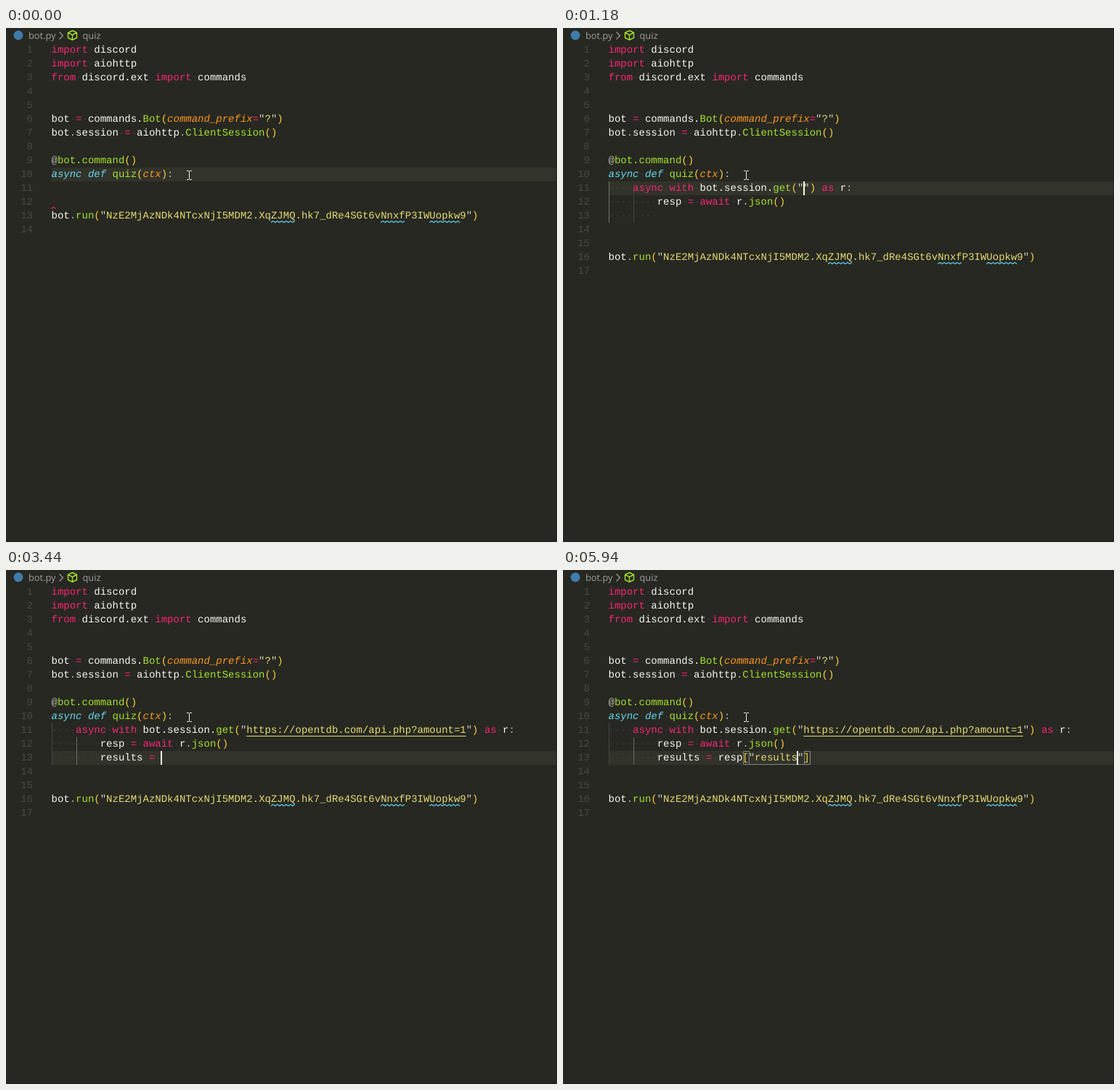
Animation, 759 px wide and 707 px high, one loop 6000 ms. Source, as an HTML page:

```html
<!DOCTYPE html>
<html lang="en">
<head>
<meta charset="utf-8">
<title>Code editor</title>
<style>
  html, body { margin: 0; width: 100%; height: 100%; overflow: hidden; background: #272822; }
  svg { display: block; width: 100%; height: 100%; }
  text { font: 14px "Liberation Mono", "Courier New", monospace; white-space: pre; text-rendering: geometricPrecision; }
  .crumb { font: 12.8px "Open Sans", "Noto Sans", sans-serif; fill: #a0a19a; }
  .num { fill: #484943; }
  .w { fill: #f8f8f2; }
  .k { fill: #f92672; }
  .f { fill: #a6e22e; }
  .b { fill: #fbd13c; }
  .s { fill: #e6db74; }
  .q { fill: #cfcfb4; }
  .p { fill: #b4b5ab; }
  .c { fill: #66d9ef; font-style: italic; }
  .a { fill: #fd971f; font-style: italic; }
  .item { fill: #b4b5ae; }
  .hit { fill: #f8f8f2; font-weight: bold; }
  .note { fill: #8e8f87; }
</style>
</head>
<body>
<svg id="stage" viewBox="0 0 759 707" preserveAspectRatio="none"></svg>
<script>
const LOOP = 6000, CHAR = 8.4, LEFT = 62.5, ROW = 19;
const stage = document.getElementById("stage");
const colX = col => LEFT + col * CHAR;
const rowY = row => 21 + (row - 1) * ROW;

const rect = (x, y, w, h, fill) => `<rect x="${x}" y="${y}" width="${w}" height="${h}" fill="${fill}"/>`;
const text = (cls, x, y, str) => `<text class="${cls}" x="${x}" y="${y}" xml:space="preserve">${str}</text>`;
const line = (d, color, w = 1) => `<path d="${d}" fill="none" stroke="${color}" stroke-width="${w}"/>`;

// Code lines: segments split by "|", the first letter of each is its style.
const HEAD = {
  1: "kimport|w discord",
  2: "kimport|w aiohttp",
  3: "kfrom|w discord.ext |kimport|w commands",
  6: 'wbot |k=|w commands.|fBot|b(|acommand_prefix|k=|q"|s?|q"|b)',
  7: "wbot|p.|wsession |k=|w aiohttp|p.|fClientSession|b()",
  9: "p@|fbot.command|b()",
  10: "casync def|f quiz|b(|actx|b)|p:"
};
const RUN = 'wbot|p.|frun|b(|q"|sNzE2MjAzNDk4NTcxNjI5MDM2.XqZJMQ.hk7_dRe4SGt6vNnxfP3IWUopkw9|q"|b)';
const URL_TEXT = "https://opentdb.com/api.php?amount=1";
const withLine = url => `k    async with|w bot.session.|fget|b(|q"|s${url}|q"|b)|k as|w r|p:`;
const block = (url, last = "") =>
  [withLine(url), "w        resp |k=|k await|w r|p.|fjson|b()", "w        " + last];
const typed = (last, col, popup = "", more = {}) =>
  ({ body: block(URL_TEXT, last), row: 13, col, popup, caret: 1, wavy: null, ...more });
const assign = (value, col, popup, more) => typed("results |k=|w " + value, col, popup, more);
const keyed = (word, more) => assign(`resp|b[|q"|s${word}|q"|b]`, 24 + word.length, "", { brackets: 25 + word.length, ...more });
const bang = (str, popup) => ({ body: ["w    " + str], col: 4 + str.length, popup, caret: 1 });

// Completion lists: the first letter is the icon kind.
const LISTS = {
  "!a": "s!ahtp fabs vaiohttp fall kand fany kas fascii kassert kasync sasync/with kawait",
  "!ah": "s!ahtp vaiohttp cArithmeticError sasync/with",
  "!aht": "s!ahtp vaiohttp cArithmeticError",
  "!ahtp": "s!ahtp vaiohttp",
  r: "vr kraise frange frepr vresp kreturn creversed fround cRecursionError cReferenceError cResourceWarning cRuntimeError",
  re: "vresp frepr kreturn creversed cRecursionError cReferenceError cResourceWarning frange kraise cRuntimeError cConnectionResetError cConnectionRefusedError",
  res: "vresp vresults cResourceWarning creversed cRecursionError cConnectionResetError cConnectionRefusedError",
  resu: "cResourceWarning cRecursionError cConnectionRefusedError",
  resp: "vresp"
};
const NOTES = { "!ahtp": "You need to have bo…", "async/with": "Code snippet for an…" };

const BEATS = [
  [0, { body: [], row: 10, col: 0, caret: 0, popup: "", error: 1, link: 0, wavy: null, brackets: 0 }],
  [160, { body: ["w    "], row: 11, col: 4, caret: 1 }],
  [470, { caret: 0 }],
  [620, bang("!", "")],
  [700, bang("!a", "!a")],
  [780, bang("!ah", "!ah")],
  [860, { ...bang("!aht", "!aht"), error: 0 }],
  [940, bang("!ahtp", "!ahtp")],
  [1100, { body: block(""), col: 32, popup: "" }],
  [1420, { body: block(URL_TEXT), col: 68 }],
  [1500, { link: 1 }],
  [1580, typed("", 8)],
  [1660, typed("r", 9)],
  [1730, { popup: "r" }],
  [1900, typed("re", 10, "re")],
  [2040, typed("res", 11, "res")],
  [2190, typed("resu", 12, "resu")],
  [2270, { wavy: [8, 12] }],
  [2430, typed("resul", 13, "", { wavy: [8, 12] })],
  [2510, { wavy: [8, 13] }],
  [2670, typed("result", 14)],
  [2750, typed("results", 15)],
  [2900, typed("results ", 16)],
  [3210, typed("results |k=", 17)],
  [3440, assign("", 18)],
  [3600, assign("r", 19, "r")],
  [3830, assign("re", 20, "re")],
  [3910, assign("res", 21, "res")],
  [3990, assign("resp", 22, "resp")],
  [4450, { caret: 0 }],
  [4610, assign("resp|b[]", 23, "", { brackets: 23 })],
  [4760, keyed("")],
  [5070, keyed("r")],
  [5300, keyed("re")],
  [5460, keyed("res")],
  [5620, keyed("resu", { wavy: [24, 28] })],
  [5780, keyed("resul", { wavy: [24, 29] })],
  [5860, keyed("result")],
  [5940, keyed("results")]
];

function codeLine(row, markup) {
  const y = rowY(row);
  let col = 0, out = "";
  for (const part of markup.split("|")) {
    const str = part.slice(1);
    const lead = str.length - str.trimStart().length;
    if (str.trim()) out += text(part[0], colX(col + lead), y + 13, str.trim());
    [...str].forEach((ch, i) => {
      if (ch === " ") out += rect(colX(col + i) + 3.7, y + 8.6, 1.3, 1.3, "#4b4c46");
    });
    col += str.length;
  }
  return out;
}

function squiggle(row, from, to, color) {
  const end = colX(to), y = rowY(row) + 16.5;
  let x = colX(from), d = `M${x} ${y + 2}`;
  for (let i = 0; x + 3 <= end; i++) d += `L${x += 3} ${y + (i % 2 ? 2 : 0)}`;
  return line(d, color, 1.2);
}

// Boxes around the bracket pair, joined along the bottom edge.
function bracketBoxes(row, open, close) {
  const y = rowY(row) + .5;
  const [a, b] = [open, close].map(col => Math.ceil(colX(col)) + .5);
  const box = x => `M${x} ${y}h8v18h-8z`;
  return line(`${box(a)}${box(b)}M${a + 8} ${y + 18}H${b}`, "#85867e");
}

const cube = (x, y, color) =>
  line(`M${x} ${y - 6.5}l6 3v7l-6 3l-6 -3v-7zM${x - 6} ${y - 3.5}l6 3l6 -3M${x} ${y - .5}v7`, color, 1.4);

const ICONS = {
  f: (x, y) => cube(x, y, "#a6e22e"),
  s: (x, y) => line(`M${x - 6.5} ${y + 5}v-11h13v11`, "#a6e22e", 1.2) +
    `<path d="M${x - 6.5} ${y + 6}h14" stroke="#a6e22e" stroke-width="1.3" stroke-dasharray="1.5 1.5"/>`,
  v: (x, y) => line(`M${x - 4.5} ${y - 4}h-2.5v8h2.5M${x + 4.5} ${y - 4}h2.5v8h-2.5`, "#66d9ef", 1.3) +
    line(`M${x - 3.5} ${y}l4 -2.5l3 1v2l-4 2.5l-3 -1zl3 1l4 -2.5`, "#66d9ef", 1.1),
  c: (x, y) => line(`M${x - 6} ${y - 2}l3.5 -3.5l2.5 2.5l-3.5 3.5zM${x - 1} ${y - 1}h4M${x + 1} ${y - 1}v5h2` +
    `M${x + 3} ${y - 1}l2 -2l1.5 1.5l-2 2zM${x + 3} ${y + 4}l2 -2l1.5 1.5l-2 2z`, "#66d9ef", 1.4),
  k: (x, y) => line(`M${x - 7} ${y - 4.5}h8m2 0h4M${x - 7} ${y - 1.5}h4m2 0h7M${x - 7} ${y + 1.5}h8m2 0h3M${x - 7} ${y + 4.5}h5m2 0h7`, "#f92672", 1.2)
};

function itemLabel(label, query) {
  const want = label[0] === "!" ? query : query.replace("!", "");
  let hit = 0;
  return [...label].map(ch => {
    const match = ch.toLowerCase() === want[hit];
    if (match) hit++;
    return `<tspan class="${match ? "hit" : "item"}">${ch}</tspan>`;
  }).join("");
}

function popup(query, row, col) {
  const items = LISTS[query].split(" ");
  const x = Math.floor(colX(col)), top = rowY(row + 1);
  let out = rect(x, top, 431, items.length * ROW, "#3c3d37") + rect(x, top, 430, ROW, "#6e7066");
  items.forEach((item, i) => {
    const y = top + i * ROW, label = item.slice(1);
    out += ICONS[item[0]](x + 11.5, y + 11) + text("item", x + 23.6, y + 14, itemLabel(label, query));
    if (NOTES[label]) out += text("note", x + 243.5, y + 14, NOTES[label]);
  });
  if (items.length === 12) out += `<rect x="${x + 420}" y="${top}" width="10" height="182" fill="#797979" opacity=".18"/>`;
  return out;
}

function breadcrumb() {
  return `<circle cx="17" cy="10" r="6.5" fill="#3f7cac"/>` +
    text("crumb", 31, 15, "bot.py") + line("M73.5 5.5l5 5l-5 5", "#a0a19a", 1.2) +
    cube(91.5, 10, "#a6e22e") + text("crumb", 105.5, 15, "quiz");
}

function draw(s) {
  const runRow = 13 + s.body.length;
  let out = rect(0, 0, 759, 707, "#272822") + breadcrumb();
  out += rect(63, rowY(s.row), 696, ROW, "#32332b");

  for (let n = 1; n <= runRow + 1; n++)
    out += `<text class="num" text-anchor="end" x="37" y="${rowY(n) + 13}">${n}</text>`;

  s.body.forEach((_, i) => {
    const y = rowY(11 + i), inner = s.row > 11;
    out += rect(63, y, 1, ROW, inner ? "#464741" : "#74756d");
    if (i) out += rect(97, y, 1, ROW, inner ? "#6c6d66" : "#464741");
  });

  for (const n in HEAD) out += codeLine(+n, HEAD[n]);
  s.body.forEach((markup, i) => out += codeLine(11 + i, markup));
  out += codeLine(runRow, RUN);

  for (const [from, to] of [[36, 40], [54, 58], [62, 67]]) out += squiggle(runRow, from, to, "#5ccdee");
  if (s.wavy) out += squiggle(s.row, ...s.wavy, "#5ccdee");
  if (s.error) out += squiggle(12, 0, 1, "#f5233f");
  if (s.link) out += rect(colX(32), rowY(11) + 17, 36 * CHAR, 1, "#e6db74");
  if (s.brackets) out += bracketBoxes(s.row, 22, s.brackets);

  if (s.popup) out += popup(s.popup, s.row, s.col);
  if (s.caret) out += rect(Math.floor(colX(s.col)), rowY(s.row), 2, ROW, "#f8f8f0");
  out += line("M249 196.5h3m1 0h3M252.5 197v11M249 208.5h3m1 0h3", "#f0f0ea");
  out += rect(758, 0, 1, 707, "#1f201b") + rect(0, 706, 759, 1, "#1f201b");
  stage.innerHTML = out;
}

let shown = -1;
const start = performance.now();

function tick() {
  const time = (performance.now() - start) % LOOP;
  const past = BEATS.filter(([at]) => at <= time);
  if (past.length !== shown) {
    shown = past.length;
    draw(Object.assign({}, ...past.map(([, patch]) => patch)));
  }
  requestAnimationFrame(tick);
}
tick();
</script>
</body>
</html>
```
